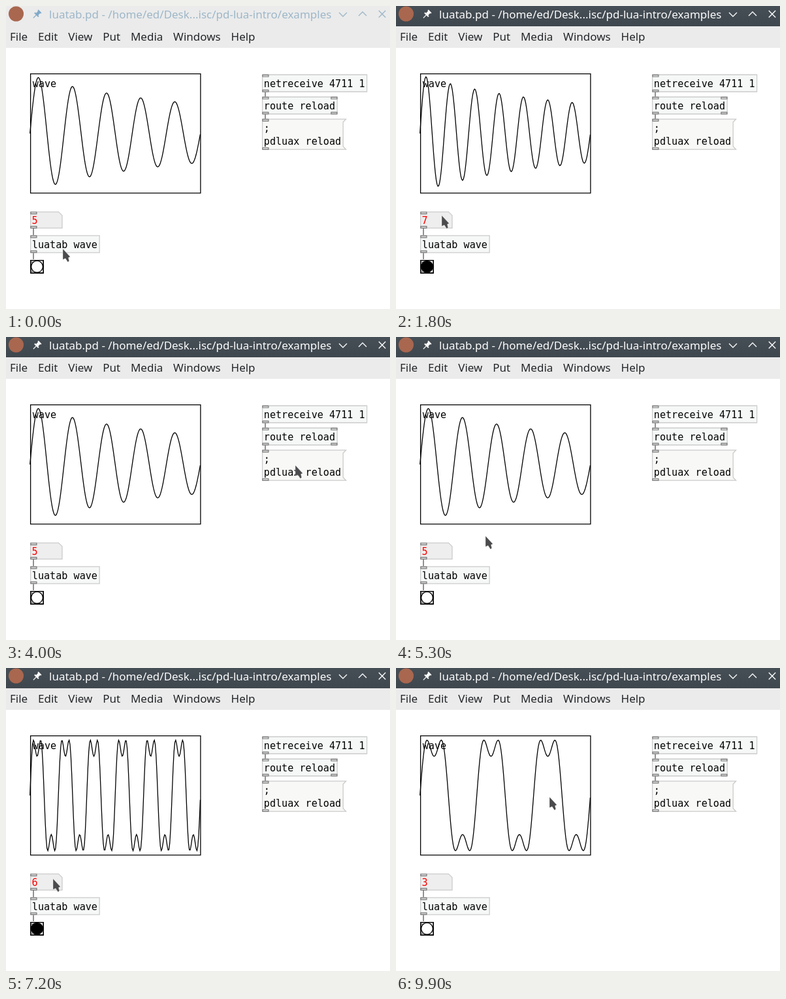
Recreate the animation shown at these times as an HTML page with a canvas. Size 588 px wide and 463 px high, loop 10000 ms.

```html
<!DOCTYPE html>
<html lang="en">
<head>
<meta charset="utf-8">
<title>luatab</title>
<style>
  html, body { margin: 0; width: 100%; height: 100%; overflow: hidden; background: #fff; }
  canvas { display: block; }
</style>
</head>
<body>
<canvas id="stage" width="588" height="463"></canvas>
<script>
const ctx = document.getElementById('stage').getContext('2d');
const LOOP = 10000, STEP = 100, HOLD = 240;
const SANS = '17px "Noto Sans", sans-serif';
const MONO = '15.14px "DejaVu Sans Mono", monospace';
const BORDER = '#cccccc', FILL = '#f6f8f8', LINE = 1.3;
const FOCUS = 900, FLASH = 4600, SQUARE = 5900;

// drags on the number box: start, end, new number
const DRAGS = [[800, 1120, 8], [1700, 2020, 5], [5900, 6400, 9], [6900, 7400, 4], [8200, 8300, 3]];
// pointer glides: start, end, x, y
const GLIDES = [
  [0, 700, 70, 324], [3000, 4000, 443, 196], [5000, 5400, 80, 324], [5500, 5700, 75, 324],
  [6900, 7400, 71, 324], [8800, 9100, 150, 263], [9400, 9900, 235, 193]
];

const progress = (t, from, to) => Math.min(1, Math.max(0, (t - from) / (to - from)));

function numberAt(t) {
  let n = 5;
  for (const [from, to, goal] of DRAGS) n += (goal - n) * progress(t, from, to);
  return Math.round(n);
}

function pointerAt(t) {
  let x = 87, y = 371;
  for (const [from, to, goalX, goalY] of GLIDES) {
    const u = progress(t, from, to), e = u * u * (3 - 2 * u);
    x += (goalX - x) * e;
    y += (goalY - y) * e;
  }
  return [x, y - 1.8 * (numberAt(t) - 5)];
}

function text(str, x, y, font, color = '#000') {
  ctx.font = font;
  ctx.fillStyle = color;
  ctx.fillText(str, x, y);
}

function trace(points, close) {
  ctx.beginPath();
  points.forEach(([x, y]) => ctx.lineTo(x, y));
  if (close) ctx.closePath();
}

function stroke(color, width = LINE) {
  ctx.strokeStyle = color;
  ctx.lineWidth = width;
  ctx.stroke();
}

function shape(points, fill, color, width) {
  trace(points, true);
  ctx.fillStyle = fill;
  ctx.fill();
  stroke(color, width);
}

function line(points, color, width) {
  trace(points);
  stroke(color, width);
}

function disc(x, y, r, fill) {
  ctx.beginPath();
  ctx.arc(x, y, r, 0, Math.PI * 2);
  ctx.fillStyle = fill;
  ctx.fill();
}

function rect(x, y, w, h, fill, color, width) {
  shape([[x, y], [x + w, y], [x + w, y + h], [x, y + h]], fill, color, width);
}

const xlet = (x, y) => rect(x, y, 9, 2.6, '#e4e4e4', '#777', 1.2);
const cord = (x, y) => line([[x, y], [x, y + 10]], '#555', LINE);

// inlets on the top edge, outlets on the bottom edge
function ports(x, y, h, offsets = [0]) {
  for (const dx of offsets) {
    xlet(x + 0.3 + dx, y + 0.4);
    xlet(x + 0.3 + dx, y + h - 2.7);
  }
}

function objectBox(x, y, w, label, offsets) {
  rect(x, y, w, 26, FILL, BORDER);
  text(label, x + 2.2, y + 19.3, MONO);
  ports(x, y, 26, offsets);
}

function numberBox(x, y, n) {
  const w = 48.4, h = 24.8, cut = 5.5;
  shape([[x, y], [x + w - cut, y], [x + w, y + cut], [x + w, y + h], [x, y + h]], '#eeeeee', BORDER);
  ports(x, y, h);
  text(n, x + 1.8, y + 18.7, MONO, '#f00');
}

function messageBox(x, y, lines, flash) {
  const w = 128, h = 46.4, in1 = w - 4.4, cut = 4.8;
  shape([[x, y], [x + w, y], [x + in1, y + cut], [x + in1, y + h - cut], [x + w, y + h], [x, y + h]],
    '#f8f8f6', BORDER, flash ? 6.5 : LINE);
  ports(x, y, h);
  lines.forEach((str, i) => text(str, x + 2.2, y + 18.9 + 20.3 * i, MONO));
}

function bang(x, y, on) {
  rect(x, y, 19.4, 19.4, '#fff', '#000');
  ports(x, y, 19.4);
  disc(x + 9.7, y + 9.7, 8.9, on ? '#000' : '#fff');
  stroke('#000');
  rect(x, y, 19.4, 19.4, 'transparent', '#000');
}

function graph(x, y, freq, square) {
  rect(x, y, 260.3, 182.3, '#fff', '#000');
  text('wave', x + 3.1, y + 20.4, MONO);
  const points = [];
  for (let k = 0; k <= 200; k++) {
    const t = Math.min(k / 200, 0.999), a = 2 * Math.PI * freq * t;
    const v = square ? Math.sin(a) + Math.sin(3 * a) / 3 : Math.sin(a) / (1 + t);
    points.push([x - 0.9 + 261 * t, y + 91.1 - 89.6 * v]);
  }
  line(points, '#000', LINE);
}

function pin(x, y, color) {
  ctx.save();
  ctx.translate(x, y);
  ctx.rotate(Math.PI / 4);
  ctx.scale(0.85, 0.85);
  ctx.fillStyle = color;
  ctx.fillRect(-4, -8, 8, 2.4);
  ctx.fillRect(-2.7, -6, 5.4, 6);
  ctx.fillRect(-5, -0.5, 10, 2.3);
  ctx.fillRect(-0.7, 1, 1.4, 8);
  ctx.restore();
}

function titleBar(active) {
  const color = active ? '#fcfcfc' : '#9db7c8';
  ctx.fillStyle = '#ebebeb';
  ctx.fillRect(0, 0, 588, 64);
  if (active) {
    const g = ctx.createLinearGradient(0, 0, 0, 31);
    g.addColorStop(0, '#464f56');
    g.addColorStop(1, '#3f474e');
    ctx.fillStyle = g;
    ctx.fillRect(0, 0, 588, 31);
  }
  disc(15.5, 12, 11.5, '#a9674f');
  pin(47.3, 12.8, active ? color : '#7fa9c9');
  text('luatab.pd - /home/ed/Desk...isc/pd-lua-intro/examples', 66, 19, SANS, color);

  const chevron = (x, y, d) => line([[x - 6, y - d], [x, y + d], [x + 6, y - d]], color, 1.4);
  chevron(516, 13, 3);
  chevron(546, 12, -3);
  for (const d of [-5.2, 5.2]) line([[576 - d, 7], [576 + d, 17.4]], color, 1.4);
}

function menu() {
  let x = 6;
  for (const name of ['File', 'Edit', 'View', 'Put', 'Media', 'Windows', 'Help']) {
    text(name, x, 53, SANS, '#232629');
    x += ctx.measureText(name).width + 15.8;
  }
}

function patch(t) {
  const n = numberAt(t);
  graph(37.6, 103.6, n, t >= SQUARE);

  cord(42, 340);
  cord(42, 377);
  numberBox(37.6, 314.6, n);
  objectBox(37.6, 350.8, 105.6, 'luatab wave');
  bang(37.8, 388.6, n !== numberAt(t - HOLD));

  cord(397, 130);
  cord(397, 164);
  objectBox(392.6, 105, 160, 'netreceive 4711 1');
  objectBox(392.6, 139, 114.6, 'route reload', [0, 105]);
  messageBox(392.6, 172.8, [';', 'pdluax reload'], t >= FLASH && t < FLASH + 200);
}

function pointer(x, y) {
  ctx.save();
  ctx.translate(Math.round(x), Math.round(y));
  shape([[0, 0], [0, 16.5], [4, 14.7], [7.6, 20.3], [9.8, 18.8], [8.6, 13.6], [11.4, 12.2]],
    '#4b4b4d', 'rgba(255,255,255,0.45)', 0.8);
  ctx.restore();
}

function draw(t) {
  ctx.fillStyle = '#fff';
  ctx.fillRect(0, 0, 588, 463);
  titleBar(t >= FOCUS);
  menu();
  patch(t);
  pointer(...pointerAt(t));
}

const start = performance.now();
function tick() {
  const t = (performance.now() - start) % LOOP;
  draw(Math.floor(t / STEP) * STEP);
  requestAnimationFrame(tick);
}
tick();
</script>
</body>
</html>
```
